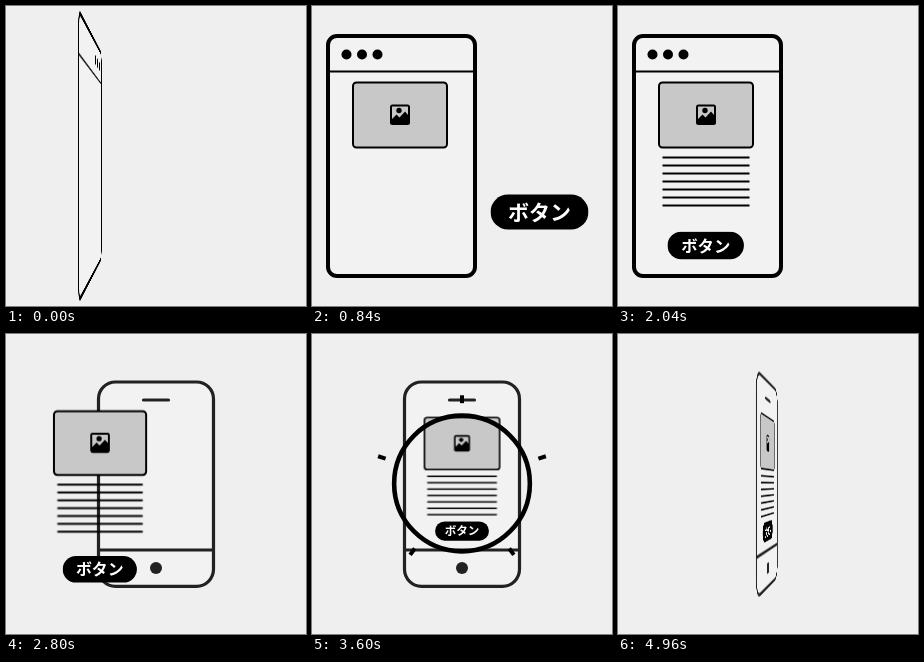
An HTML page that plays this animation: 300 px wide and 300 px high, repeating every 5000 ms.

```html
<!DOCTYPE html>
<html lang="ja">
<head>
<meta charset="utf-8">
<title>Window to phone</title>
<style>
html, body { margin: 0; width: 100%; height: 100%; overflow: hidden; background: #efefef; }
svg { position: absolute; left: 0; top: 0; width: 300px; height: 300px; overflow: visible; }
svg, svg * { animation: 5s linear infinite both; }

#window { transform-origin: 89.5px 150px; animation-name: window; }
#device { transform-origin: 150px 150px; animation-name: flip-out; }
#phone { transform-origin: 150px 150px; animation-name: phone; }
#image { transform-origin: 88px 109px; animation-name: image; }
#text { transform-origin: 88px 175.5px; animation-name: text; }
#text path { transform-origin: 44.5px 0; animation-name: write; animation-delay: calc(var(--i) * 92ms); }
#button { transform-origin: 0 0; animation-name: button; }
#burst { animation-name: burst; }
#burst circle { animation-name: ring, thin; }
#burst path { animation-name: shoot, stub; }

#button text { font: 700 21px "Noto Sans CJK JP", "Noto Sans CJK", "Noto Sans", sans-serif; }

@keyframes window {
  0% { transform: translateX(-3.5px) perspective(420px) rotateY(-99.5deg) scale(1); animation-timing-function: cubic-bezier(.34, 1.56, .64, 1); }
  9.6%, 46% { transform: translateX(0) perspective(420px) rotateY(0deg) scale(1); animation-timing-function: ease-in; }
  50.4%, 100% { transform: translateX(0) perspective(420px) rotateY(0deg) scale(0); }
}
@keyframes flip-out {
  0%, 84.8% { transform: perspective(540px) rotateY(0deg); animation-timing-function: cubic-bezier(.36, 0, .66, -.56); }
  100% { transform: perspective(540px) rotateY(102deg); }
}
@keyframes phone {
  0%, 49.4% { transform: scale(0); animation-timing-function: cubic-bezier(.34, 1.4, .64, 1); }
  54.4%, 100% { transform: scale(1); }
}
@keyframes image {
  0% { transform: translate(140px, 250px) scale(1.21); animation-timing-function: cubic-bezier(.215, .61, .355, 1); }
  8%, 8.4% { transform: translate(140px, 19px) scale(1.21); animation-timing-function: cubic-bezier(.333, 0, .667, 1); }
  16.8%, 54.4% { transform: translate(0, 0) scale(1); animation-timing-function: cubic-bezier(.333, 0, .667, 1); }
  62.8%, 100% { transform: translate(62px, .5px) scale(.8); }
}
@keyframes text {
  0%, 19.2% { opacity: 0; transform: translate(0, 0) scale(1); }
  19.3%, 54.4% { opacity: 1; transform: translate(0, 0) scale(1); animation-timing-function: cubic-bezier(.333, 0, .667, 1); }
  62.8%, 100% { opacity: 1; transform: translate(62px, -14px) scale(.8); }
}
@keyframes write {
  0%, 19.4% { transform: scaleX(0); }
  21.24%, 100% { transform: scaleX(1); }
}
@keyframes button {
  0% { transform: translate(227.5px, 330px) scale(1); animation-timing-function: cubic-bezier(.215, .61, .355, 1); }
  8%, 32.4% { transform: translate(227.5px, 206px) scale(1); animation-timing-function: cubic-bezier(.333, 0, .667, 1); }
  40.8%, 54.4% { transform: translate(87.7px, 239.5px) scale(.78); animation-timing-function: cubic-bezier(.333, 0, .667, 1); }
  62.8%, 100% { transform: translate(150px, 197px) scale(.55); }
}
@keyframes burst {
  0%, 58.5% { visibility: hidden; }
  58.6%, 77.1% { visibility: visible; }
  77.2%, 100% { visibility: hidden; }
}
@keyframes ring {
  0%, 58.6% { r: 0; animation-timing-function: cubic-bezier(.215, .61, .355, 1); }
  77.2%, 100% { r: 70px; }
}
@keyframes thin {
  0%, 58.6% { stroke-width: 16.5px; }
  77.2%, 100% { stroke-width: 0; }
}
@keyframes shoot {
  0%, 58.6% { translate: 0 0; animation-timing-function: cubic-bezier(.215, .61, .355, 1); }
  77.2%, 100% { translate: 0 -91px; }
}
@keyframes stub {
  0%, 58.6% { scale: 1 0; }
  64.8%, 68% { scale: 1 1; }
  77.2%, 100% { scale: 1 0; }
}
</style>
</head>
<body>
<svg id="window" viewBox="0 0 300 300">
  <rect x="16" y="30" width="147" height="240" rx="9" fill="#f2f2f2" stroke="#000" stroke-width="4"/>
  <path d="M16 65.5H163" stroke="#000" stroke-width="2"/>
  <circle cx="34.5" cy="48.5" r="5"/>
  <circle cx="50" cy="48.5" r="5"/>
  <circle cx="65.5" cy="48.5" r="5"/>
</svg>

<svg id="device" viewBox="0 0 300 300">
  <g id="phone" fill="none" stroke="#222" stroke-width="3.2">
    <rect x="92.5" y="48" width="115" height="204.3" rx="17" fill="#f2f2f2"/>
    <path d="M92.5 216H207.5"/>
    <path d="M137.5 66H162.5" stroke-linecap="round"/>
    <circle cx="150" cy="234" r="6" fill="#222" stroke="none"/>
  </g>

  <g id="image">
    <rect x="41" y="76.5" width="94" height="65" rx="3.5" fill="#c8c8c8" stroke="#000" stroke-width="2"/>
    <rect x="78" y="98.5" width="20" height="20.5" rx="2.5"/>
    <path d="M80 100.5H96V109L93 105.5L87.5 111.5L84.5 108.5L80 113Z" fill="#c8c8c8"/>
    <circle cx="87" cy="104.5" r="2.7"/>
  </g>

  <g id="text" stroke="#000" stroke-width="2">
    <path style="--i:0" d="M44.5 151.5h87"/>
    <path style="--i:1" d="M44.5 159.5h87"/>
    <path style="--i:2" d="M44.5 167.5h87"/>
    <path style="--i:3" d="M44.5 175.5h87"/>
    <path style="--i:4" d="M44.5 183.5h87"/>
    <path style="--i:5" d="M44.5 191.5h87"/>
    <path style="--i:6" d="M44.5 199.5h87"/>
  </g>

  <g id="button">
    <rect x="-49" y="-17.5" width="98" height="35" rx="17.5"/>
    <text y="8" fill="#fff" text-anchor="middle">ボタン</text>
  </g>

  <g id="burst" transform="translate(150 149.5)" fill="none" stroke="#000" stroke-width="4">
    <g><path d="M0 0V14"/></g>
    <g transform="rotate(72)"><path d="M0 0V14"/></g>
    <g transform="rotate(144)"><path d="M0 0V14"/></g>
    <g transform="rotate(216)"><path d="M0 0V14"/></g>
    <g transform="rotate(288)"><path d="M0 0V14"/></g>
    <circle/>
  </g>
</svg>
</body>
</html>
```
